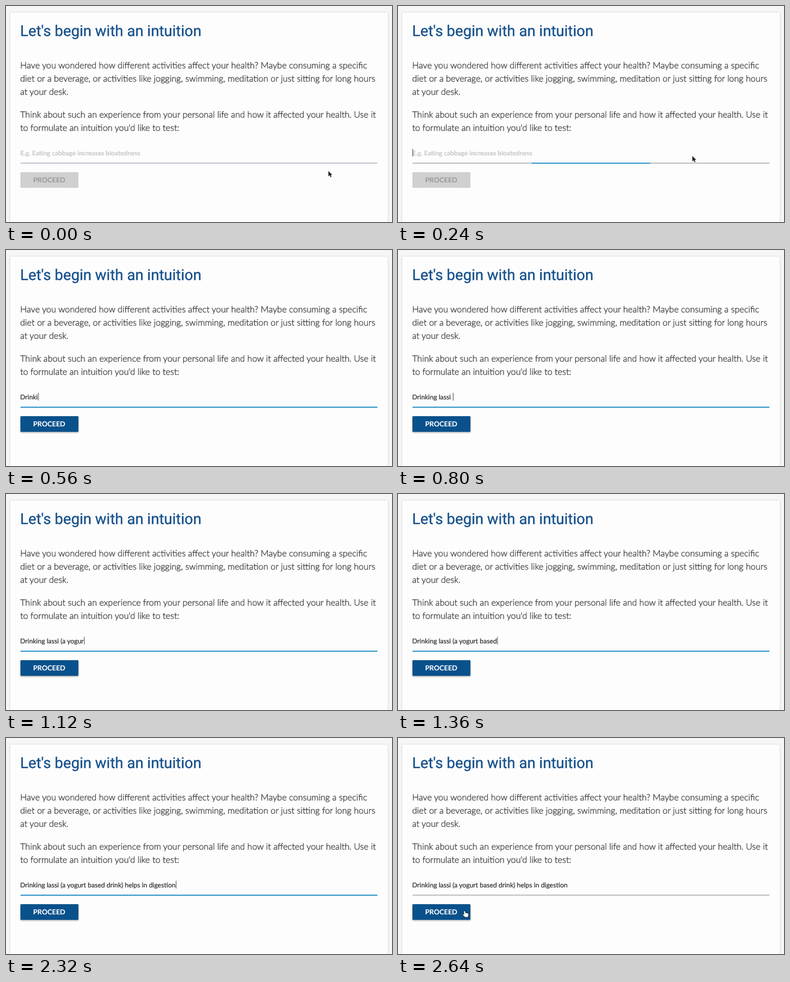
Animation of 640 by 360 pixels, one loop 2.72 s. Source, as an HTML page with a canvas:

```html
<!DOCTYPE html>
<html lang="en">
<head>
<meta charset="utf-8">
<style>
html, body { margin: 0; height: 100%; overflow: hidden; background: #f6f6f6; }
canvas { display: block; }
</style>
</head>
<body>
<canvas id="stage" width="640" height="360"></canvas>
<script>
const ctx = document.getElementById('stage').getContext('2d');
const LOOP = 2720, STEP = 80;
const INPUT_FONT = '11px Lato, sans-serif';
const ANSWER = 'Drinking lassi (a yogurt based drink) helps in digestion';
const BODY = [
  [104, 'Have you wondered how different activities affect your health? Maybe consuming a specific'],
  [126, 'diet or a beverage, or activities like jogging, swimming, meditation or just sitting for long hours'],
  [148, 'at your desk.'],
  [186, 'Think about such an experience from your personal life and how it affected your health. Use it'],
  [207.6, "to formulate an intuition you'd like to test:"],
];
// Each key: time, value(s)
const TYPING = [[320, 0], [400, 1], [800, 15], [1360, 30], [1920, 42], [2320, 56]];
const POINTER_IN = [[0, 534.5, 275], [80, 526, 268], [160, 500, 256], [240, 488, 250]];
const POINTER_OUT = [[2400, 300, 312], [2480, 190, 310], [2560, 116, 293], [2640, 109, 288]];

const clamp = v => Math.max(0, Math.min(1, v));
const ramp = (t, from, to) => clamp((t - from) / (to - from));
const mix = (a, b, k) => `rgb(${a.map((v, i) => Math.round(v + (b[i] - v) * k))})`;

function along(keys, t, n = 1) {
  let i = 0;
  while (i < keys.length - 2 && t >= keys[i + 1][0]) i++;
  const a = keys[i], b = keys[i + 1];
  return a[n] + (b[n] - a[n]) * ramp(t, a[0], b[0]);
}

// A hairline outline gives the text a slightly heavier weight
function text(str, x, y, font, color, outline = 0.2) {
  ctx.font = font;
  ctx.fillStyle = ctx.strokeStyle = color;
  ctx.lineWidth = outline;
  ctx.fillText(str, x, y);
  ctx.strokeText(str, x, y);
}

function box(x, y, w, h, color, blur = 0, dy = 0, shade = 0) {
  ctx.save();
  ctx.shadowColor = `rgba(0,0,0,${shade})`;
  ctx.shadowBlur = blur;
  ctx.shadowOffsetY = dy;
  ctx.fillStyle = color;
  ctx.beginPath();
  ctx.roundRect(x, y, w, h, 1);
  ctx.fill();
  ctx.restore();
}

function pointer(x, y, path, fill, stroke) {
  ctx.save();
  ctx.translate(x, y);
  const shape = new Path2D(path);
  ctx.lineJoin = 'round';
  ctx.lineWidth = 1.4;
  ctx.strokeStyle = stroke;
  ctx.stroke(shape);
  ctx.fillStyle = fill;
  ctx.fill(shape);
  ctx.restore();
}
const arrow = (x, y) => pointer(x, y, 'M0 0V9L2.2 7L3.6 10.4L5.2 9.7L3.8 6.5H6.6Z', '#222', '#fff');
const hand = (x, y) => pointer(x, y,
  'M0 1Q1-.5 2 1L3 4Q4 3 4.6 4Q5.6 3.3 6.2 4.4Q7.4 4 7.6 5.2V8L6.4 10.5H2.2L-1.5 6.8Q-1.5 5.2 1 6Z', '#fff', '#111');

function draw(t) {
  ctx.fillStyle = '#f6f6f6';
  ctx.fillRect(0, 0, 640, 360);
  box(7, 11, 626, 370, '#fdfdfd', 3, 0.5, 0.22);

  text("Let's begin with an intuition", 23.6, 50, '24.9px Roboto, sans-serif', '#144f8a', 0.3);
  for (const [y, line] of BODY) text(line, 23.5, y, '300 14.64px Lato, sans-serif', '#3c3c3c', 0.35);

  // Input field
  const count = Math.floor(along(TYPING, t) + 0.01);
  const typed = ANSWER.slice(0, count);
  if (count) text(typed, 23.5, 249, INPUT_FONT, '#2b2b2b');
  else text('E.g. Eating cabbage increases bloatedness', 23.7, 249, 'bold 10.78px Lato, sans-serif', '#cacaca');
  const focused = t >= 240 && t < 2560;
  if (focused) {
    ctx.font = INPUT_FONT;
    box(24 + ctx.measureText(typed).width, 238, 1, 13, '#555');
  }
  box(24, 261.3, 592, 1.3, t < 240 ? '#a8a8bb' : '#a0a0a0');
  if (focused) {
    const w = 592 * ramp(t, 160, 400);
    box(320 - w / 2, 261, w, 2, '#3c9ccd');
  }

  // Button
  const on = ramp(t, 240, 480);
  box(24, 277, 96, 26, mix([208, 208, 208], [9, 81, 140], on), 3, 1, 0.45 * on);
  text('PROCEED', 45, 294, 'bold 11.5px Lato, sans-serif', mix([155, 155, 155], [255, 255, 255], on), 0.1);

  if (t < 320) arrow(along(POINTER_IN, t, 1), along(POINTER_IN, t, 2));
  if (t >= 2400) {
    const x = along(POINTER_OUT, t, 1), y = along(POINTER_OUT, t, 2);
    (x < 120 ? hand : arrow)(x, y);
  }
}

ctx.textRendering = 'geometricPrecision';
function tick() {
  draw(Math.floor(performance.now() % LOOP / STEP) * STEP);
  requestAnimationFrame(tick);
}
tick();
</script>
</body>
</html>
```
